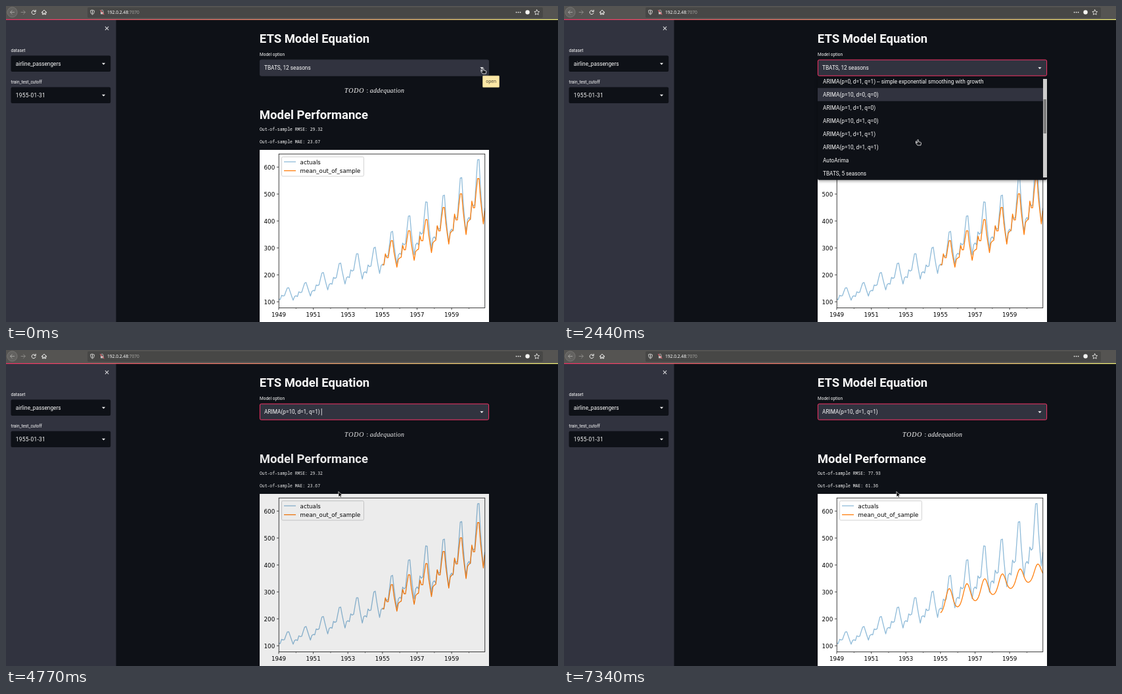
These frames come from a looping animation (840 by 481 pixels, 8000 ms). An HTML page:

```html
<!DOCTYPE html>
<html lang="en">
<head>
<meta charset="utf-8">
<style>
html, body { margin: 0; width: 100%; height: 100%; overflow: hidden; background: #0e1117; }
svg { display: block; }
text { font-family: Roboto, "Noto Sans", sans-serif; font-size: 8.27px; fill: #fafafa; white-space: pre; }
.h { font-size: 18.5px; font-weight: 700; }
.label { font-size: 6.5px; }
.mono { font-family: "Noto Sans Mono", "DejaVu Sans Mono", monospace; font-size: 6.4px; }
.math { font-family: "Liberation Serif", "Noto Serif", serif; font-size: 10px; font-style: italic; }
.url { font-family: "Noto Sans", "Open Sans", sans-serif; font-size: 6.65px; }
.plot text { font-family: "DejaVu Sans", sans-serif; font-size: 8.7px; fill: #000; }
.line { fill: none; stroke-width: 1.3; stroke-linejoin: round; }
.actual { stroke: #8fbbd9; }
.mean { stroke: #ff7f0e; }
.icon { fill: none; stroke: #f4f4f2; stroke-width: 1; stroke-linejoin: round; stroke-linecap: round; }
</style>
</head>
<body>
<svg width="840" height="481" viewBox="0 0 840 481">
  <defs>
    <linearGradient id="deco"><stop stop-color="#f63366"/><stop offset="1" stop-color="#fffd80"/></linearGradient>
    <clipPath id="listClip"><rect x="386" y="111" width="349" height="150"/></clipPath>
    <clipPath id="axesClip"><rect x="415" y="225" width="314" height="234.5"/></clipPath>
    <filter id="shadow" x="-5%" y="-5%" width="110%" height="115%" color-interpolation-filters="sRGB">
      <feDropShadow dx="0" dy="2" stdDeviation="2" flood-opacity=".35"/>
    </filter>
    <path id="drop" d="M-2.6-1.2h5.2L0 1.5z" fill="#fafafa"/>
  </defs>

  <!-- page -->
  <rect width="840" height="481" fill="#0e1117"/>
  <rect y="20" width="167.5" height="461" fill="#31333f"/>

  <!-- browser bar -->
  <rect width="840" height="20" fill="#555452"/>
  <rect x="124" y="2" width="693" height="16" rx="2" fill="#474746"/>
  <rect y="20" width="840" height="1.2" fill="url(#deco)"/>
  <circle cx="9.5" cy="9.5" r="7.6" fill="#636260" stroke="#83827f" stroke-width=".7"/>
  <g class="icon">
    <path d="M12.6 9.5H6.6M9.2 6.7L6.4 9.5l2.8 2.8" stroke="#a3a29f"/>
    <path d="M23 9.5h6M26.5 6.7l2.8 2.8-2.8 2.8" stroke="#8b8a87"/>
    <path d="M44.6 8A3 3 0 1 0 45 10.6M45.2 6.2v2.4h-2.4"/>
    <path d="M54.2 9.8L58 6.2l3.8 3.6M55.4 9.4v3.4h1.8v-2h1.6v2h1.8V9.4"/>
    <path d="M131.5 6.2l2.8 1c0 3-.8 4.8-2.8 5.9-2-1.1-2.8-2.9-2.8-5.9z" stroke-width=".8"/>
    <path d="M131.5 7.4v4.4" stroke-width=".8"/>
    <path d="M144.6 9V7.7a1.6 1.6 0 0 1 3.2 0V9" stroke="#c9c9c7" stroke-width=".8"/>
    <rect x="144" y="9.2" width="4.4" height="3.2" fill="#c9c9c7" stroke="none"/>
    <path d="M143.3 6.3l5.8 6.6" stroke="#ff4f5e"/>
    <path d="M807.8 5.7l1.2 2.5 2.7.4-2 1.9.5 2.7-2.4-1.3-2.4 1.3.5-2.7-2-1.9 2.7-.4z" stroke-width=".8"/>
  </g>
  <g fill="#f4f4f2">
    <circle cx="776.6" cy="9.6" r=".9"/><circle cx="779.6" cy="9.6" r=".9"/><circle cx="782.6" cy="9.6" r=".9"/>
    <circle cx="793.6" cy="9.5" r="3.2"/>
  </g>
  <text class="url" x="154" y="12">192.0.2.48<tspan fill="#a5a4a2">:7070</tspan></text>

  <!-- sidebar -->
  <path d="M150.9 31.4l5.2 5.2m0-5.2l-5.2 5.2" stroke="#d5d5d8" stroke-width="1.1"/>
  <text class="label" x="7.6" y="69.7">dataset</text>
  <rect x="7.5" y="75.5" width="151.7" height="24.5" rx="2" fill="#0e1117"/>
  <text x="14.8" y="90.7">airline_passengers</text>
  <use href="#drop" x="148.5" y="88"/>
  <text class="label" x="7.6" y="117.5">train_test_cutoff</text>
  <rect x="7.5" y="123.5" width="151.7" height="24.5" rx="2" fill="#0e1117"/>
  <text x="14.8" y="138.6" letter-spacing=".35">1955-01-31</text>
  <use href="#drop" x="148.5" y="136"/>

  <!-- main column -->
  <text class="h" x="385.8" y="56.3">ETS Model Equation</text>
  <text class="label" x="386" y="76">Model option</text>
  <rect id="box" x="386.4" y="82" width="348.2" height="24.2" rx="2" fill="#31333f"/>
  <text id="choice" x="393" y="97"></text>
  <rect id="caret" y="89" width=".8" height="10.5" fill="#fafafa"/>
  <use href="#drop" x="724" y="94.5"/>

  <g id="report">
    <text class="math" x="515" y="132" letter-spacing=".85">TODO</text>
    <text class="math" x="548.4" y="132" style="font-style:normal">:</text>
    <text class="math" x="553.8" y="132" letter-spacing=".23">addequation</text>
    <text class="h" x="385.8" y="172.2">Model Performance</text>
    <text class="mono" id="rmse" x="386" y="190"></text>
    <text class="mono" id="mae" x="386" y="208.6"></text>
  </g>

  <g id="plot" class="plot">
    <rect x="386" y="219" width="349" height="262" fill="#fff"/>
    <g clip-path="url(#axesClip)">
      <path id="actual" class="line actual"/>
      <path id="seasonal" class="line mean"/>
      <path id="damped" class="line mean"/>
    </g>
    <rect x="415.2" y="225.2" width="313.6" height="234.2" fill="none" stroke="#000" stroke-width=".75"/>
    <g id="ticks" stroke="#000"></g>
    <g id="tickText"></g>
    <rect x="419.5" y="229.7" width="125" height="29.4" rx="1.8" fill="#fff" fill-opacity=".8" stroke="#ccc" stroke-width=".85"/>
    <path class="line actual" d="M423 237.2h18"/>
    <path class="line mean" d="M423 250.7h18"/>
    <text x="447.6" y="240.6">actuals</text>
    <text x="447.6" y="253.8">mean_out_of_sample</text>
  </g>

  <!-- option list -->
  <g id="menu">
    <rect x="386" y="108" width="349" height="156.7" rx="2" fill="#0e1117" filter="url(#shadow)"/>
    <g clip-path="url(#listClip)">
      <g id="rows"><rect id="hover" x="386" width="343" height="20" fill="#31333f"/></g>
    </g>
    <rect x="729" y="111" width="6" height="150" fill="#cdcdcd"/>
    <rect id="thumb" x="729.6" width="4.4" height="52" rx=".5" fill="#7b7b7b"/>
  </g>

  <g id="tip">
    <rect x="725.5" y="106.3" width="25" height="17.4" rx="1" fill="#fce8a6" stroke="#d8c68a" stroke-width=".7"/>
    <text class="url" x="730.2" y="117.2" style="fill:#4b4738">open</text>
  </g>

  <path id="hand" d="M-.9 5V1C-.9-.3.9-.3.9 1V3.3L4 4Q5 4.3 4.9 5.4L4.3 8.6H-.6L-3 5.6Q-3-.4-2.6 4.3Z" fill="#16171c" stroke="#fff" stroke-width=".8" stroke-linejoin="round"/>
  <path id="arrow" d="M0 0V8.2L1.9 6.5 3.1 9.3 4.5 8.7 3.3 6H5.8Z" fill="#000" stroke="#fff" stroke-width=".7" stroke-linejoin="round"/>
</svg>
<script>
const LOOP = 8000;
const el = Object.fromEntries([...document.querySelectorAll('[id]')].map(n => [n.id, n]));
const clamp = (v, lo = 0, hi = 1) => Math.min(hi, Math.max(lo, v));
const mix = (a, b, p) => a + (b - a) * p;

function add(parent, tag, attrs, text = '') {
  const node = document.createElementNS('http://www.w3.org/2000/svg', tag);
  for (const k in attrs) node.setAttribute(k, attrs[k]);
  node.textContent = text;
  parent.append(node);
}

// ---- chart ----
const px = month => 415 + month * 2.193;
const py = value => 491.2 - value * 0.41;

function plot(node, from, to, value, step = 1) {
  let d = '';
  for (let m = from; m <= to; m += step) d += `${d ? 'L' : 'M'}${px(m).toFixed(2)} ${py(value(m)).toFixed(2)}`;
  node.setAttribute('d', d);
}

// Yearly mean times a month factor; summer peaks sharpen over the years.
const yearMean = [127, 140, 170, 197, 225, 239, 284, 328, 368, 381, 428, 476];
const monthFactor = [.91, .884, 1.007, .976, .981, 1.113, 1.227, 1.22, 1.06, .922, .801, .899];
plot(el.actual, 0, 143, m => {
  const p = (m - 5.5) / 12, i = clamp(Math.floor(p), 0, 10);
  const s = monthFactor[m % 12] - 1;
  return mix(yearMean[i], yearMean[i + 1], p - i) * (1 + s * (s > 0 ? .8 + m / 240 : 1));
});

// One seasonal shape that grows by a fixed factor every year.
const season = [.722, .73, .85, .806, .806, .915, 1, 1, .87, .78, .698, .787];
plot(el.seasonal, 72, 143, m => 327 * 1.1125 ** Math.floor(m / 12 - 6) * season[m % 12]);

// A rising wave whose swing slowly shrinks.
plot(el.damped, 72, 143, m => {
  const a = (m - 78) / 12.3 * 2 * Math.PI, swing = 38 - .185 * (m - 85);
  return 280 + 1.69 * (m - 85) + swing * (Math.cos(a) + .12 * Math.cos(2 * a));
}, .5);

for (let v = 100; v <= 600; v += 100) {
  add(el.ticks, 'path', { d: `M412 ${py(v)}h3`, 'stroke-width': .7 });
  add(el.tickText, 'text', { x: 409.2, y: py(v) + 3.3, 'text-anchor': 'end' }, v);
}
for (let i = 0; i < 12; i++) {
  const major = i % 2 === 0, x = px(i * 12);
  add(el.ticks, 'path', { d: `M${x} 459.5v${major ? 3 : 1.75}`, 'stroke-width': major ? .7 : .5 });
  if (major) add(el.tickText, 'text', { x, y: 472.6, 'text-anchor': 'middle' }, 1949 + i);
}

// ---- option list ----
const ROW = 20, TOP = 110.8;
const arima = (p, d, q, note = '') => `ARIMA(p=${p}, d=${d}, q=${q})${note}`;
const picked = arima(10, 1, 1), initial = 'TBATS, 12 seasons';
[
  'Naive', arima(1, 0, 0), arima(0, 1, 0, ' -- random walk'),
  arima(0, 1, 1, ' -- simple exponential smoothing with growth'),
  arima(10, 0, 0), arima(1, 1, 0), arima(10, 1, 0), arima(1, 1, 1), picked,
  'AutoArima', 'TBATS, 5 seasons', initial
].forEach((name, i) => add(el.rows, 'text', { x: 394, y: TOP + 12.9 + i * ROW }, name));

// ---- timeline ----
// Progress 0..1 in jumps of 100 ms; the first jump is at `from`, the last at `to`.
const steps = (t, from, to) => clamp((Math.floor((t - from) / 100) + 1) * 100 / (to - from + 100));
const smooth = p => p * p * (3 - 2 * p);

const stops = [[726, 94.5], [538.6, 203.4], [418, 212], [506, 215.5]];
function pointer(t) {
  const legs = [smooth(steps(t, 1440, 1940)), steps(t, 2500, 2800), steps(t, 3000, 3000)];
  return [0, 1].map(k => legs.reduce((v, p, i) => mix(v, stops[i + 1][k], p), stops[0][k]));
}
const caretOn = t => [500, 1840, 3000, 4970, 6240, 7340].filter(at => at <= t).length % 2;
const staleness = t => 1 - .67 * (clamp(Math.floor((t - 4540) / 220), 0, 4) / 4) ** 1.55;

const show = (node, on) => node.setAttribute('visibility', on ? 'visible' : 'hidden');
const fade = (node, o) => node.setAttribute('opacity', o);
const say = (node, s) => { if (node.textContent !== s) node.textContent = s; };

function draw(t) {
  const focused = t >= 500, chosen = t >= 3670, closed = t >= 3800;
  const scored = t >= 6070, redrawn = t >= 6800;
  const [x, y] = pointer(t), dim = staleness(t);

  for (const node of [el.hand, el.arrow]) node.setAttribute('transform', `translate(${x} ${y})`);
  show(el.hand, !closed);
  show(el.arrow, closed);
  show(el.tip, !focused);

  el.box.setAttribute('stroke', focused ? '#f63366' : '#31333f');
  say(el.choice, chosen ? picked : initial);
  el.caret.setAttribute('x', chosen ? 479.8 : 462.4);
  show(el.caret, caretOn(t));

  // The highlight follows a scroll only once the pointer moves again.
  const scroll = 66 * steps(t, 2040, 2240);
  const row = Math.floor((y + (t < 2500 ? 0 : scroll) - TOP) / ROW);
  fade(el.menu, closed ? 0 : chosen ? .4 : steps(t, 600, 800));
  el.rows.setAttribute('transform', `translate(0 ${-scroll})`);
  el.hover.setAttribute('y', TOP + row * ROW);
  fade(el.hover, row < 0 ? 0 : 1);
  el.thumb.setAttribute('y', 111 + scroll * .47);

  fade(el.report, scored ? 1 : dim);
  say(el.rmse, 'Out-of-sample RMSE: ' + (scored ? '77.93' : '29.32'));
  say(el.mae, 'Out-of-sample MAE: ' + (scored ? '61.36' : '23.67'));
  fade(el.plot, redrawn ? 1 : dim);
  show(el.seasonal, !redrawn);
  show(el.damped, redrawn);
}

const start = performance.now();
function tick() {
  draw((performance.now() - start) % LOOP);
  requestAnimationFrame(tick);
}
tick();
</script>
</body>
</html>
```
